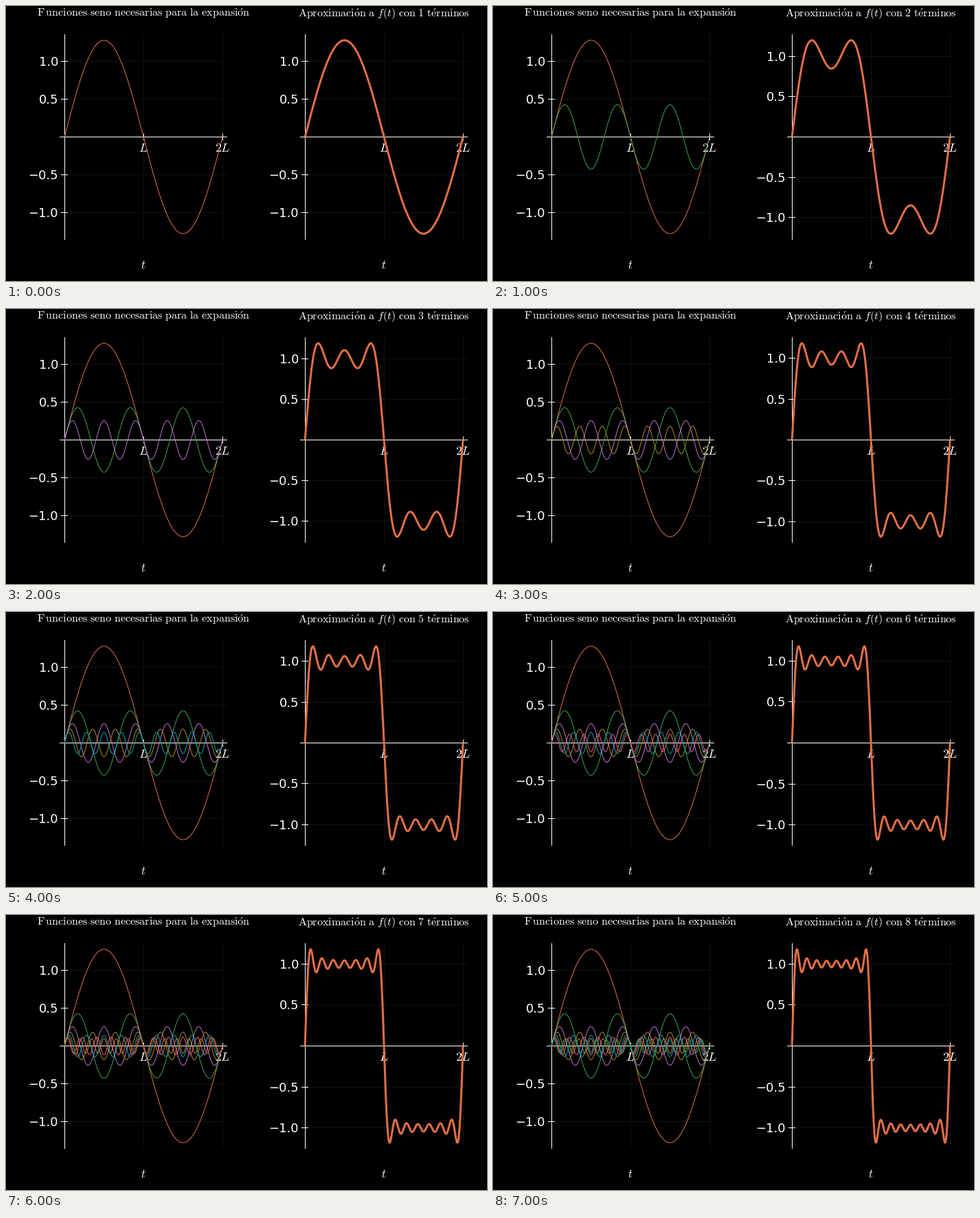
Write a matplotlib script that moves like this. It is 700 px wide and 400 px high and loops after 8 s.

```python
import numpy as np
import matplotlib.pyplot as plt
from matplotlib.animation import FuncAnimation

plt.rcParams["mathtext.fontset"] = "cm"
plt.rcParams["font.family"] = "DejaVu Sans"

TERMS = 8
PT = 0.72                      # points per pixel at 100 dpi
MID = 190.5                    # height of y = 0 in pixels
HALF = 149.1                   # half height of a panel
HALF_WAVE = 115                # pixels per L
PAD = 1.06                     # axis range relative to the data
TICKS = (-1.0, -0.5, 0.5, 1.0)
GRID = "#111111"
COLORS = ["#E26F46", "#3DA44D", "#C271D2", "#AC8D18",
          "#00A9AD", "#ED5E93", "#C68225", "#00A98D"]

t = np.linspace(0, 2, 1201)
waves = [4 / (k * np.pi) * np.sin(k * np.pi * t)
         for k in range(1, 2 * TERMS, 2)]

fig = plt.figure(figsize=(7, 4), dpi=100, facecolor="black")
ax = fig.add_axes([0, 0, 1, 1])
ax.set_xlim(0, 700)
ax.set_ylim(400, 0)
ax.axis("off")


def roman(text):
    return r"\mathrm{" + text.replace(" ", r"\ ") + "}"


def label(x, y, text, size, ha="center"):
    return ax.text(x, y, text, fontsize=size * PT, color="white",
                   ha=ha, va="baseline", zorder=3)


def line(xs, ys, color="white", width=1.0, zorder=2):
    return ax.plot(xs, ys, color=color, lw=width * PT, zorder=zorder,
                   solid_capstyle="butt", solid_joinstyle="round",
                   snap=False)[0]


def centre(v):
    """Centre of the pixel that holds v."""
    return np.floor(v) + 0.5


class Panel:
    def __init__(self, left):
        self.left = left
        edge = np.floor(left)
        span = (edge - 7, edge + 2 * HALF_WAVE + 7)
        sides = (np.floor(MID - HALF), np.floor(MID + HALF) + 1)
        base = centre(MID)

        line(span, (base, base))
        line([centre(left)] * 2, sides)
        for i, name in ((1, "$L$"), (2, "$2L$")):
            x = left + i * HALF_WAVE
            line([centre(x)] * 2, sides, GRID, 1, 1)
            line([centre(x)] * 2, (base - 5, base + 5))
            label(x, 212, name, 18)
        label(left + HALF_WAVE, 382, "$t$", 17)

        self.grid = [line(span, (base, base), GRID, 1, 1) for _ in TICKS]
        self.marks = [line((edge - 5, edge + 5), (base, base)) for _ in TICKS]
        self.names = [label(left - 9, MID, f"{v:.1f}".replace("-", "\u2212"),
                            18, "right") for v in TICKS]

    def set_peak(self, peak):
        self.scale = HALF / (PAD * peak)
        for v, grid, mark, name in zip(TICKS, self.grid, self.marks, self.names):
            y = MID - v * self.scale
            grid.set_ydata([centre(y)] * 2)
            mark.set_ydata([centre(y)] * 2)
            name.set_y(y + 6.5)

    def points(self, values):
        return self.left + t * HALF_WAVE, MID - values * self.scale


sines = Panel(85.1)
sines.set_peak(waves[0].max())
curves = [line(*sines.points(w), c, 1, 4) for w, c in zip(waves, COLORS)]
label(200.3, 15, "$" + roman(r"F\,unciones seno necesarias para la "
                             r"expansi\acute{o}n") + "$", 16.05)

approx = Panel(435.1)
total = line([], [], COLORS[0], 3, 4)
title = label(550.3, 15, "", 16.05)


def draw(i):
    for k, curve in enumerate(curves):
        curve.set_visible(k <= i)
    values = sum(waves[:i + 1])
    approx.set_peak(values.max())
    total.set_data(*approx.points(values))
    title.set_text("$" + roman(r"Aproximaci\acute{o}n a ") + "f(t)"
                   + roman(rf" con {i + 1} t\acute{{e}}rminos") + "$")
    return [*curves, total, title]


anim = FuncAnimation(fig, draw, frames=TERMS, interval=1000,
                     init_func=lambda: draw(0), repeat=True, repeat_delay=0)
plt.show()
```
